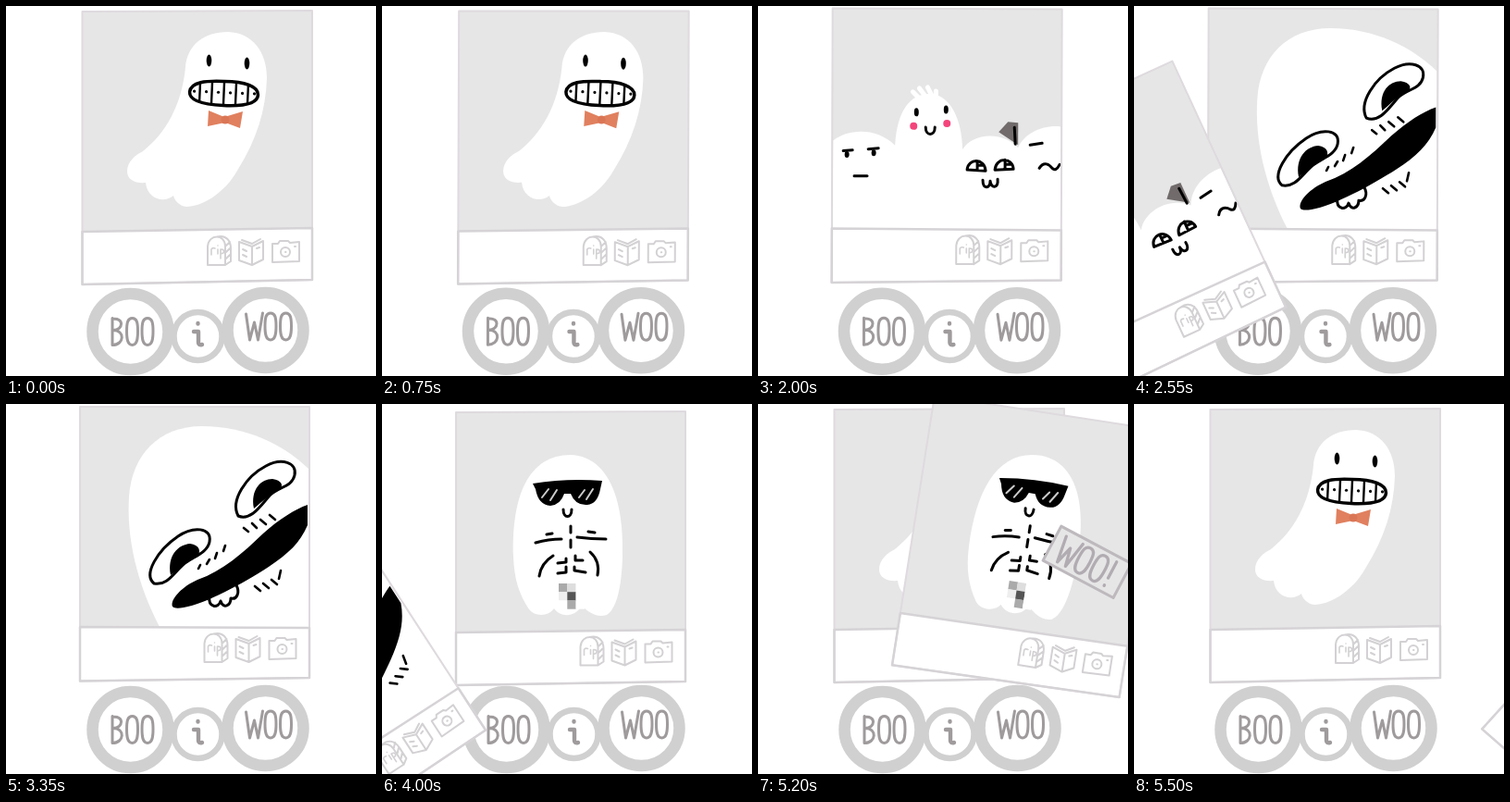
Write an HTML page that moves like this. It is 400 px wide and 400 px high and loops after 5550 ms.

```html
<!DOCTYPE html>
<html lang="en">
<head>
<meta charset="utf-8">
<title>Ghost cards</title>
<style>
  html, body { margin: 0; width: 100%; height: 100%; overflow: hidden; background: #fff; }
  svg { display: block; width: 400px; height: 400px; }
  .ink { fill: none; stroke: #000; stroke-width: 3; }
  .grey { fill: none; stroke: #d3d1d3; stroke-width: 2; }
  .word { fill: none; stroke: #9f9b9d; stroke-width: 3; }
  .mark { fill: none; stroke: #b1acb1; stroke-width: 3; }
  .ring { fill: #fff; stroke: #d0d0d0; }
</style>
</head>
<body>
<svg id="stage" viewBox="0 0 400 400" stroke-linecap="round" stroke-linejoin="round"></svg>
<script>
const LOOP = 5550, STEP = 50, BOIL = 150, SPAN = LOOP / 4;

// time in turn, angle, sideways shift, drop
const SWIPE = [[965, 0, 0, 0], [1050, 10.5, 102.5, 0], [1225, 33, 276, 146],
               [1337, 42, 366, 172], [1390, 50, 440, 190]];
const STAMP_IN = 750, STAMP_LEN = 200;

const GLYPHS = {
  B: [15.5, 'M0 0V29M0 1C13 -1 12 13 1 13C14 13 13 29 0 29'],
  O: [16.5, 'M6 0C1 0 0 5 0 14S1 29 6 29S12 23 12 14S11 0 6 0Z'],
  W: [20.5, 'M0 1L4 29L9 10L13 29L18 0'],
  '!': [6, 'M2 0V19M2 27V28']
};

const path = (d, cls = 'ink', style = '') => `<path class="${cls}" d="${d}" style="${style}"/>`;
const fill = (d, color = '#000') => `<path d="${d}" fill="${color}"/>`;
const oval = (x, y, rx, ry = rx, color = '#000') =>
  `<ellipse cx="${x}" cy="${y}" rx="${rx}" ry="${ry}" fill="${color}"/>`;
const ring = (x, y, rx, ry, w) =>
  `<ellipse class="ring" cx="${x}" cy="${y}" rx="${rx}" ry="${ry}" stroke-width="${w}"/>`;
const put = (x, y, body, more = '') => `<g transform="translate(${x} ${y}) ${more}">${body}</g>`;

function letters(text, cls) {
  let x = 0;
  return [...text].map(c => {
    const [w, d] = GLYPHS[c];
    const out = put(x, 0, path(d, cls));
    x += w;
    return out;
  }).join('');
}

const icons = () =>
  path('M218 280V260C219 246 237 246 237 260V280ZM228 249.5C238 247 243 254 243 262V276L237 280M238 259L242 255M238 266L242 262M238 273L242 269', 'grey') +
  path('M222 269V263Q223 261 226 262M229 263V268M232 273V263Q237 263 235 267L232 268M229 259V259', 'grey', 'stroke-width:1.6') +
  path('M252 255L266 260L278 254V274L266 280L252 275ZM266 260V280M255 253L266 257L275 252M256 263L260 265M256 269L260 271M271 262L274 261', 'grey') +
  path('M288 257H294L296 254H305L307 256L317 255V276L288 277ZM297 266A5 5 0 1 0 307 266A5 5 0 1 0 297 266M302 266H302.5M312 260H313', 'grey');

function bowGhost() {
  let teeth = '', dots = '';
  for (let x = -26; x <= 26; x += 13) {
    const h = 12.5 * Math.sqrt(1 - (x / 37) ** 2);
    teeth += `M${x} ${-h}V${h}`;
  }
  for (let x = -32; x < 34; x += 13) dots += oval(x, -1, 1.6);
  const mouth = path('M-37 0C-36 -11 -20 -13 0 -13C22 -14 37 -9 37 0C37 10 20 13 0 13C-22 13 -37 10 -37 0Z', 'ink', 'stroke-width:3.5') +
    path(teeth, 'ink', 'stroke-width:2.4') + dots;
  return fill('M194 66C196 42 214 28 240 28C267 29 282 50 282 78C281 112 271 145 250 178C236 203 211 217 195 217C187 216 182 210 181 205C172 213 153 210 151 191C140 192 131 188 131 179C131 168 140 161 148 157C172 138 190 108 194 66Z', '#fff') +
    oval(219.5, 59, 2.8, 6.5) + oval(260.5, 62, 2.8, 6.5) +
    put(235.5, 94.5, mouth, 'rotate(2.5)') +
    fill('M219 113L236 120L256 114L253 132L237 126L218 130Z', '#e0805f') + oval(237, 123, 4.5, 4.5, '#da7656');
}

const crowd = () =>
  fill('M260 136L270 125L281 126L281 150Z', '#716b6b') +
  fill('M81 241V146C97 133 128 131 148 151C150 112 165 94 187 95C208 97 220 122 221 155C230 139 262 133 281 153C288 137 308 128 327 130V242Z', '#fff') +
  path('M174 100L167 93M181 98L174 89M188 98L183 88M192 98L192 92', 'ink', 'stroke:#fff;stroke-width:5') +
  path('M277 131L278 149M92 157L102 156M119 155L130 154M104 184H118M181 131C181 141 191 141 191 131M294 150L307 148M304 175C309 167 315 171 318 175Q322 179 326 171') +
  oval(96, 161, 2.5, 3.5) + oval(125, 159, 2.5, 3.5) +
  oval(171, 115, 2.5, 4.5) + oval(203, 112, 2.5, 4.5) +
  oval(168, 130, 4, 4, '#f4457d') + oval(204, 127, 4, 4, '#f4457d') +
  path('M226 177C227 164 245 164 246 178ZM237 168V177M237 172H244M256 177C257 163 275 163 276 176ZM267 166V176M267 171H274') +
  path('M243 188C243 198 251 198 251 189C252 198 260 197 259 187');

const grinner = () =>
  fill('M166 241C142 195 130 145 133 100C136 55 165 24 212 24C260 24 300 44 327 70V242Z', '#fff') +
  path('M160 194C148 184 164 158 186 143C202 132 223 133 220 149C218 160 205 164 195 171C183 179 176 197 160 194ZM251 121C242 104 260 78 281 67C298 58 315 63 312 77C309 90 295 89 285 99C276 109 265 127 251 121Z') +
  fill('M178 185C174 164 186 152 199 151C209 152 212 160 206 165C194 171 187 178 178 185ZM268 113C264 92 276 81 288 81C298 82 301 89 295 92C285 97 278 105 268 113Z') +
  path('M220 207C218 221 230 221 232 213C235 222 243 218 243 210C250 212 253 203 249 196', 'ink', 'fill:#fff') +
  fill('M180 219C177 211 191 197 207 190C235 180 255 162 278 140C296 124 312 114 326 109V131C318 150 305 162 284 176C256 194 216 216 192 220C186 221 182 221 180 219Z') +
  path('M208 178L210 174M217 173L220 168M226 167L228 161M235 159L237 153M257 134L262 138M266 129L271 134M275 125L281 130M285 120L291 125M269 197L275 202M278 194L284 199M287 190L293 195M297 180L295 189', 'ink', 'stroke-width:2.6');

function coolGhost() {
  let tiles = '';
  for (let i = 0; i < 9; i++)
    tiles += `<rect class="tile" x="${191 + i % 3 * 9.3}" y="${194 + (i / 3 | 0) * 9.2}" width="9.4" height="9.3"/>`;
  return fill('M142 165C140 100 158 55 204 55C248 57 262 110 260 165C259 200 253 222 243 228C232 232 222 224 216 218C208 232 192 230 186 221C180 230 165 230 159 222C148 205 143 190 142 165Z', '#fff') +
    fill('M163 86Q200 80 238 83L236 92Q233 108 222 109Q209 110 204 97L197 97Q193 109 182 110Q169 109 166 92Z') +
    path('M173 101L180 92M182 104L189 93M213 101L219 93M221 103L228 92', 'ink', 'stroke:#ccc;stroke-width:2') +
    path('M196 114C196 124 205 124 205 114M204 132V139M204 147V155M166 150Q180 146 194 146M178 141L184 140M211 144Q226 146 242 146M223 138L230 139M185 164Q172 172 170 186M225 160Q236 170 233 185M190 172L199 171L199 167M190 183L199 182V176M209 164V169L217 169M208 176V180L220 182') +
    tiles;
}

// edges: left, right, top left/right, strip left/right, bottom left/right
const CARDS = [
  { box: [82.5, 331, 6, 5, 244, 240, 301, 296], icon: [0, 0], art: bowGhost, word: 'BOO!', dir: -1 },
  { box: [80, 328, 3, 3, 241, 242, 299.5, 296], icon: [-3.5, -1], art: crowd, word: 'BOO!', dir: -1 },
  { box: [80, 328, 3, 3, 241, 242, 299.5, 296], icon: [-3.5, -1], art: grinner, word: 'BOO!', dir: -1 },
  { box: [80, 328, 9, 8, 247, 244, 304, 300], icon: [-3.5, 2.5], art: coolGhost, word: 'WOO!', dir: 1 }
];

function cardMarkup({ box, icon, art, word }) {
  const [l, r, t1, t2, s1, s2, b1, b2] = box;
  const frame = `M${l} ${t1}L${r} ${t2}L${r} ${b2}L${l} ${b1}Z`;
  const strip = `M${l} ${s1}L${r} ${s2}V${b2}L${l} ${b1}Z`;
  return `<g class="card"><g class="boil">` +
    fill(frame, '#e6e6e6') + art() + fill(strip, '#fff') +
    path(frame, 'grey', 'stroke:#dedade') +
    path(strip, 'grey', 'stroke:#d6d3d6;stroke-width:2.5') +
    put(icon[0], icon[1], icons()) +
    `<g class="stamp"><rect x="-43" y="-21" width="86" height="42" fill="#e6e6e6" stroke="#bdb9bd" stroke-width="3"/>` +
    put(-33, -15, letters(word, 'mark'), `scale(${word === 'WOO!' ? 1.1 : 1.24} 1.04)`) + '</g></g></g>';
}

const stage = document.getElementById('stage');
stage.innerHTML = '<g class="boil">' +
  ring(207.5, 357, 26, 26, 6.5) + ring(134.5, 352, 41, 41, 12.5) + ring(280.5, 350.5, 41, 40.5, 12.5) +
  put(115, 337.5, letters('BOO', 'word')) + put(259.5, 332, letters('WOO', 'word')) +
  path('M203 352H208V364Q208 367 212 366M207.5 343V343.5', 'word', 'stroke-width:4.4') +
  '</g>' + [...CARDS].reverse().map(cardMarkup).join('');

const cards = [...stage.querySelectorAll('.card')].reverse();
const stamps = cards.map(c => c.querySelector('.stamp'));
const boils = stage.querySelectorAll('.boil');
const tiles = stage.querySelectorAll('.tile');

function swipe(p) {
  if (p <= SWIPE[0][0]) return [0, 0, 0];
  let i = 1;
  while (i < SWIPE.length - 1 && p > SWIPE[i][0]) i++;
  const a = SWIPE[i - 1], b = SWIPE[i], k = (p - a[0]) / (b[0] - a[0]);
  return [1, 2, 3].map(j => a[j] + (b[j] - a[j]) * k);
}

function draw(now) {
  const t = Math.floor(now % LOOP / STEP) * STEP;
  const top = Math.floor(t / SPAN), next = (top + 1) % 4, p = t - top * SPAN;
  const tick = Math.floor(t / BOIL) % 2;
  const moving = p > SWIPE[0][0];

  cards.forEach((card, i) => {
    card.style.display = i === top || (moving && i === next) ? '' : 'none';
    const { dir } = CARDS[i];
    const [angle, dx, dy] = i === top ? swipe(p) : [0, 0, 0];
    card.setAttribute('transform', `translate(${dir * dx} ${dy}) rotate(${dir * angle} 207 150)`);
    const k = i === top ? Math.min(1, Math.max(0, (p - STAMP_IN) / STAMP_LEN)) : 0;
    stamps[i].setAttribute('opacity', k);
    stamps[i].setAttribute('transform', `translate(${207 + dir * 64} 161) rotate(${dir * 19}) scale(${1.5 - k / 2})`);
  });
  // keep the waiting card below the one being swiped
  if (cards[top].nextElementSibling) stage.append(cards[top]);

  boils.forEach(b => b.setAttribute('transform', `rotate(${tick * 0.2} 207 200)`));
  const shades = tick ? 'c7ba65e9c' : 'adfe5ffaf';
  tiles.forEach((r, i) => r.setAttribute('fill', '#' + shades[i].repeat(3)));
}

function loop() {
  draw(performance.now());
  requestAnimationFrame(loop);
}
loop();
</script>
</body>
</html>
```
